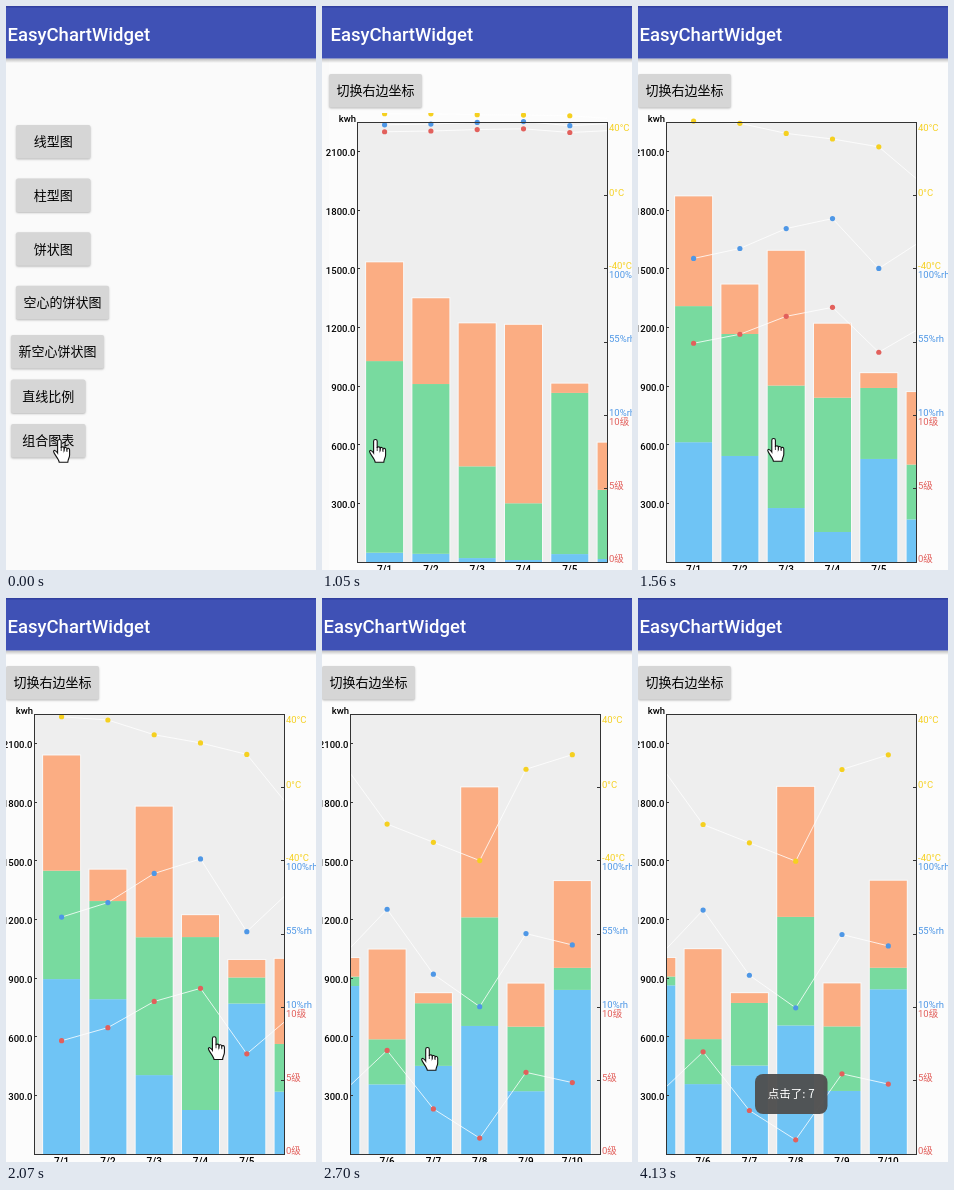
An HTML page with a canvas that plays this animation: 310 px wide and 564 px high, repeating every 4610 ms.

```html
<!DOCTYPE html>
<html lang="zh">
<head>
<meta charset="utf-8">
<title>EasyChartWidget</title>
<style>
  html, body { margin: 0; width: 100%; height: 100%; overflow: hidden; background: #fafafa; }
  canvas { display: block; width: 310px; height: 564px; }
</style>
</head>
<body>
<canvas id="stage"></canvas>
<script>
const W = 310, H = 564, LOOP = 4610;
const TAP = 780, STEP = 126.9;
const canvas = document.getElementById('stage');
const ctx = canvas.getContext('2d');
const dpr = window.devicePixelRatio || 1;
canvas.width = W * dpr;
canvas.height = H * dpr;

const LATIN = 'Roboto, sans-serif';
const HAN = '"Noto Sans CJK SC", "Noto Sans CJK", sans-serif';
const MENU = ['线型图', '柱型图', '饼状图', '空心的饼状图', '新空心饼状图', '直线比例', '组合图表'];

const LEFT = 28, RIGHT = 278, TOP = 116.5, BASE = 556.5, VIEW_TOP = 107;
const PITCH = 46.3, BAR_W = 37, MAX_SCROLL = 222;
const PX_PER_KWH = (BASE - TOP) / 2250, BAND = (BASE - TOP) / 3;
const BAR_COLORS = ['#6fc4f5', '#78da9f', '#fbad83'];

// Three stacked right-hand axes, each one band high.
const AXES = [
  { color: '#f5d020', min: -40, max: 40, unit: '°C', value: day => day.temp },
  { color: '#4e97e6', min: 10, max: 100, unit: '%rh', value: day => day.wind * 10 },
  { color: '#e2605c', min: 0, max: 10, unit: '级', value: day => day.wind }
];
const DAYS = [
  { kwh: [1005, 500, 600], temp: 38, wind: 5 },
  { kwh: [890, 455, 125], temp: 36, wind: 6 },
  { kwh: [455, 735, 660], temp: 27, wind: 8 },
  { kwh: [255, 960, 10], temp: 22, wind: 9 },
  { kwh: [865, 45, 95], temp: 15, wind: 4 },
  { kwh: [360, 230, 460], temp: -20, wind: 7 },
  { kwh: [455, 320, 50], temp: -30, wind: 3 },
  { kwh: [660, 555, 665], temp: -40, wind: 1 },
  { kwh: [325, 330, 220], temp: 10, wind: 5.5 },
  { kwh: [845, 110, 445], temp: 18, wind: 4.8 }
];

// Stops of the mouse: time, x, y.
const MOUSE = [[1290, 47, 433], [1540, 129, 432], [2190, 222, 440], [2429, -5, 442],
  [2683, 99, 449], [3064, 173, 463], [3191, 141, 462], [3445, 141, 462], [3953, 272, 550]];
const HAND = new Path2D('M4.6 14V2.3a1.8 1.8 0 0 1 3.6 0V9c0-1.7 3-1.5 3 .3 .3-1.4 2.8-1 2.8.6 ' +
  '.4-1 2.6-.7 2.6 1V16c0 3-1.8 4-1.8 7.3H6.2C6 20 .8 15 .6 12.6c0-1.8 2-1.8 4 1.4z');
const ARROW = new Path2D('M0 0V17l4-3.8 3.4 7.2 2.8-1.3-3.4-7H12z');

const lerp = (a, b, u) => a + (b - a) * u;
const ramp = (t, from, to) => Math.min(1, Math.max(0, (t - from) / (to - from)));
const smooth = u => u * u * (3 - 2 * u);

const slideOffset = t => Math.round(W * Math.exp((825 - t) / 55));
const growth = t => 1 - (1 - ramp(t, 1000, 3000)) ** 3;
const scrollAt = t => MAX_SCROLL * smooth(ramp(t, 2395, 2680));

function mouseAt(t) {
  let [, x, y] = MOUSE[0];
  MOUSE.slice(1).forEach(([time, nx, ny], i) => {
    const u = ramp(t, MOUSE[i][0], time);
    x = lerp(x, nx, u);
    y = lerp(y, ny, u);
  });
  return [x, y];
}

function text(str, x, midY, size, { color = '#000', align = 'left', font = LATIN, weight = 400 } = {}) {
  ctx.font = `${weight} ${size}px ${font}`;
  ctx.textAlign = align;
  ctx.fillStyle = color;
  ctx.fillText(str, x, midY + size * .36);
}

function rect(x, y, w, h, color) {
  ctx.fillStyle = color;
  ctx.fillRect(x, y, w, h);
}

function dot(x, y, r, color) {
  ctx.fillStyle = color;
  ctx.beginPath();
  ctx.arc(x, y, r, 0, 7);
  ctx.fill();
}

function roundBox(x, y, w, h, r, color) {
  ctx.fillStyle = color;
  ctx.beginPath();
  ctx.roundRect(x, y, w, h, r);
  ctx.fill();
}

function button(label, x, y, pressed) {
  const w = Math.max(74.5, label.length * 13 + 15);
  ctx.save();
  ctx.shadowColor = 'rgba(0,0,0,.25)';
  ctx.shadowBlur = 2 * dpr;
  ctx.shadowOffsetY = dpr;
  roundBox(x, y, w, 33.5, 2, '#d6d6d6');
  ctx.restore();
  if (pressed) {
    ctx.save();
    ctx.clip();
    rect(x, y, w, 34, 'rgba(0,0,0,.035)');
    dot(55, 443, 36, 'rgba(0,0,0,.06)');
    ctx.restore();
  }
  text(label, x + w / 2, y + 16.7, 13, { align: 'center', font: HAN });
}

function screen(x, background) {
  ctx.translate(x, 0);
  rect(0, 0, W, H, background);
  const shadow = ctx.createLinearGradient(0, 52.5, 0, 57);
  shadow.addColorStop(0, 'rgba(0,0,0,.25)');
  shadow.addColorStop(1, 'rgba(0,0,0,0)');
  rect(0, 52.5, W, 4.5, shadow);
  rect(0, 0, W, 52.5, '#3f51b5');
  rect(0, 0, W, 1.5, '#303f9f');
  text('EasyChartWidget', 1.5, 28, 18.5, { color: '#fff', weight: 500 });
}

function menuScreen(x, pressed) {
  ctx.save();
  screen(x, '#fafafa');
  MENU.forEach((label, i) => {
    const upper = i < 4;
    const y = upper ? 119 + i * 53.6 : 329 + (i - 4) * 44.5;
    button(label, upper ? 10 : 5, y, pressed && i === MENU.length - 1);
  });
  ctx.restore();
}

function drawBar(kwh, x, progress) {
  // Each segment's top grows out of the final top of the segment below it.
  let floor = BASE;
  const tops = kwh.map(amount => {
    const from = floor;
    floor -= amount * PX_PER_KWH;
    return lerp(from, floor, progress);
  });
  rect(x - 1, tops[2] - 1, BAR_W + 2, BASE - tops[2] + 1, 'rgba(255,255,255,.6)');
  tops.forEach((top, k) => {
    const bottom = k ? tops[k - 1] : BASE;
    rect(x, top, BAR_W, bottom - top, BAR_COLORS[k]);
  });
}

function drawLine(axis, band, centre, progress) {
  const points = DAYS.map((day, i) => {
    const y = TOP + BAND * (band + (axis.max - axis.value(day)) / (axis.max - axis.min));
    return [centre(i), lerp(VIEW_TOP, y, progress)];
  });
  ctx.beginPath();
  points.forEach(p => ctx.lineTo(...p));
  ctx.strokeStyle = '#fff';
  ctx.lineWidth = .8;
  ctx.stroke();
  points.forEach(p => dot(...p, 2.6, axis.color));
}

function plot(progress, scroll) {
  const centre = i => 55.6 + i * PITCH - scroll;
  ctx.save();
  ctx.beginPath();
  ctx.rect(LEFT, VIEW_TOP, RIGHT - LEFT, H - VIEW_TOP);
  ctx.clip();
  DAYS.forEach((day, i) => {
    drawBar(day.kwh, centre(i) - BAR_W / 2, progress);
    text(`7/${i + 1}`, centre(i), 563, 10, { align: 'center', weight: 500 });
  });
  AXES.forEach((axis, band) => drawLine(axis, band, centre, progress));
  ctx.restore();
}

function drawAxes() {
  const black = { align: 'right', weight: 500 };
  ctx.strokeStyle = '#333';
  ctx.lineWidth = 1;
  ctx.strokeRect(LEFT + .5, TOP, RIGHT - LEFT, BASE - TOP);
  text('kwh', 27, 113, 9.5, black);
  for (let kwh = 300; kwh < 2250; kwh += 300) {
    const y = BASE - kwh * PX_PER_KWH;
    rect(LEFT, Math.round(y) - 1, 3, 1, '#333');
    text(kwh.toFixed(1), 26.5, y + 1, 9.5, black);
  }
  AXES.forEach(({ color, min, max, unit }, band) => {
    [max, (min + max) / 2, min].forEach((value, k) => {
      const y = TOP + BAND * (band + k / 2);
      rect(RIGHT - 3, Math.round(y) - 1, 3, 1, '#333');
      text(value + unit, 280, y + (k ? -3.7 : 5.5), 9.5, { color, font: `Roboto, ${HAN}` });
    });
  });
}

function chartScreen(x, t) {
  ctx.save();
  screen(x, '#fcfcfc');
  button('切换右边坐标', 0, 68);
  rect(LEFT, TOP, RIGHT - LEFT, BASE - TOP, '#eee');
  plot(growth(t), scrollAt(t));
  drawAxes();
  ctx.restore();
}

function toast(alpha) {
  ctx.save();
  ctx.globalAlpha = alpha;
  roundBox(117, 476, 72.5, 40, 8, 'rgba(80,80,80,.96)');
  text('点击了: 7', 153.2, 496, 11.5, { color: '#fff', align: 'center', font: HAN });
  ctx.restore();
}

function mouse(t) {
  const [x, y] = mouseAt(t);
  const inside = x >= 0;
  ctx.save();
  ctx.translate(x, y);
  ctx.fillStyle = '#fff';
  ctx.strokeStyle = '#111';
  ctx.lineWidth = 1.1;
  ctx.fill(inside ? HAND : ARROW);
  ctx.stroke(inside ? HAND : ARROW);
  if (inside) {
    ctx.lineWidth = .8;
    ctx.stroke(new Path2D('M8.2 8v4M11.2 9v3.5M14 10v3'));
  }
  ctx.restore();
}

function draw(time) {
  // The picture refreshes in even steps, like a screen recording.
  const t = time < TAP ? 0 : TAP + Math.floor((time - TAP) / STEP) * STEP;
  ctx.setTransform(dpr, 0, 0, dpr, 0, 0);
  if (t <= TAP) {
    menuScreen(0, t === TAP);
  } else {
    const offset = slideOffset(t);
    menuScreen(offset - W, true);
    chartScreen(offset, t);
  }
  toast(ramp(t, 3700, 4050));
  if (t < 4050) mouse(t);
}

const start = performance.now();
function frame() {
  draw((performance.now() - start) % LOOP);
  requestAnimationFrame(frame);
}
frame();
</script>
</body>
</html>
```
